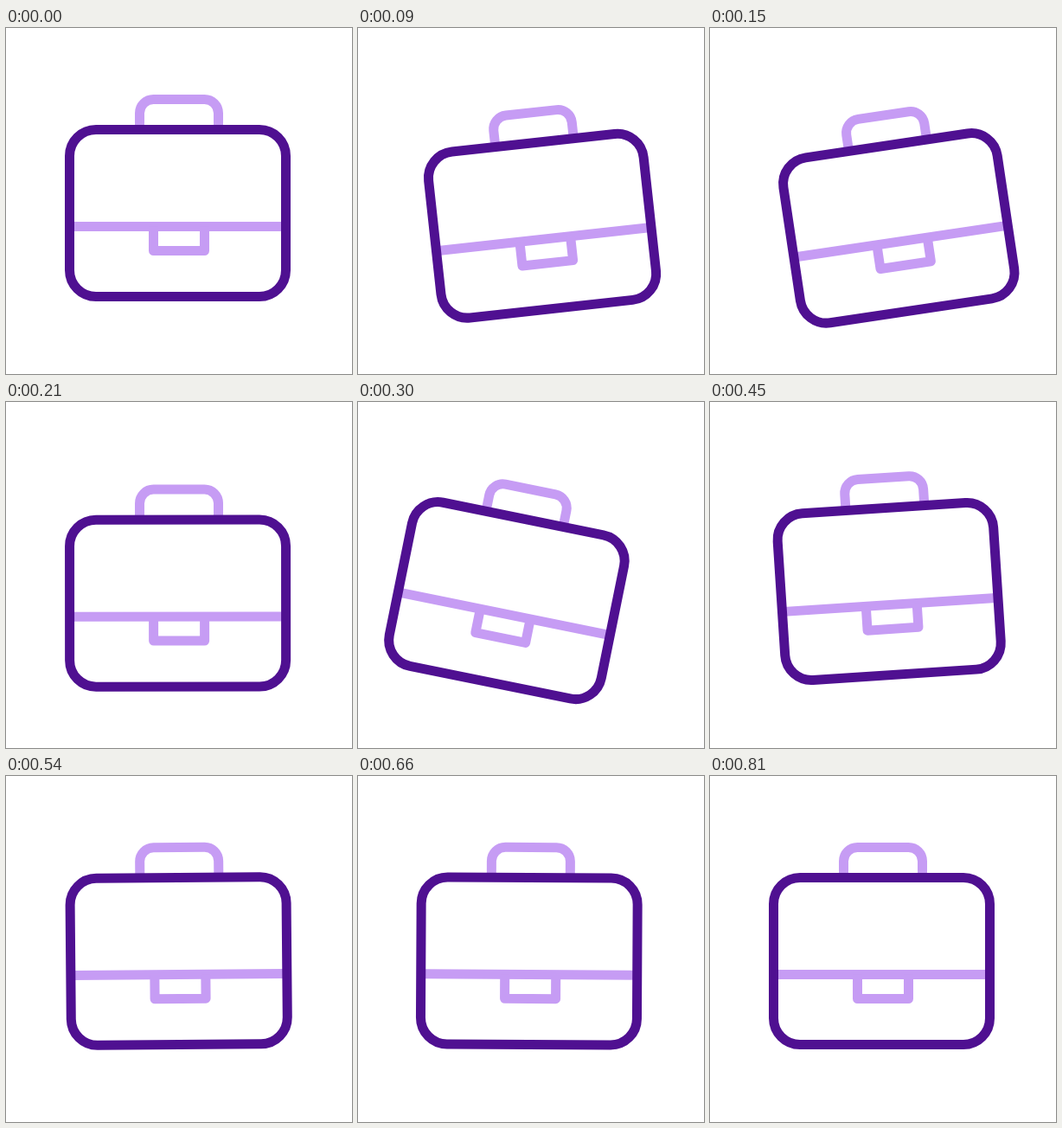
These frames come from a looping animation (400 px wide and 400 px high, 2.84 s). An HTML page with a canvas:

```html
<!DOCTYPE html>
<html lang="en">
<head>
<meta charset="utf-8">
<title>Briefcase</title>
<style>
html, body { margin: 0; width: 100%; height: 100%; overflow: hidden; background: #fff; }
canvas { display: block; width: 400px; height: 400px; }
</style>
</head>
<body>
<canvas id="stage" width="400" height="400"></canvas>
<script>
const ctx = document.getElementById('stage').getContext('2d');
const LOOP = 2840, STEP = 30, END = 810;
const DARK = '#4f1091', LIGHT = '#c69cf4';
const PIVOT = { x: 200, y: 80 };

// [time in ms, value]
const SWING = [[0, 0], [140, -8.7], [294, 11.5], [481, -4.8], [582, 2], [721, -0.86], [810, 0]];
const DROP = [[0, 0], [124, 18.6], [294, 18.6], [535, 0]];

function valueAt(keys, t) {
  for (let i = 1; i < keys.length; i++) {
    const [t0, v0] = keys[i - 1], [t1, v1] = keys[i];
    if (t < t1) {
      const k = (1 - Math.cos(Math.PI * (t - t0) / (t1 - t0))) / 2;
      return v0 + (v1 - v0) * k;
    }
  }
  return keys[keys.length - 1][1];
}

function stroke(color, path) {
  ctx.strokeStyle = color;
  ctx.beginPath();
  path();
  ctx.stroke();
}

function drawCase() {
  ctx.lineWidth = 11;
  ctx.lineJoin = 'round';
  // handle
  stroke(LIGHT, () => {
    ctx.moveTo(154.5, 114);
    ctx.arcTo(154.5, 82.5, 200, 82.5, 16);
    ctx.arcTo(245.5, 82.5, 245.5, 114, 16);
    ctx.lineTo(245.5, 114);
  });
  // seam
  stroke(LIGHT, () => {
    ctx.moveTo(76, 229.5);
    ctx.lineTo(321, 229.5);
  });
  // clasp
  stroke(LIGHT, () => {
    ctx.moveTo(170.5, 229.5);
    ctx.lineTo(170.5, 257.5);
    ctx.lineTo(229.5, 257.5);
    ctx.lineTo(229.5, 229.5);
  });
  // body
  stroke(DARK, () => ctx.roundRect(73.5, 117.5, 250, 193, 30.5));
}

function render(now) {
  const t = Math.min(END, Math.floor((now % LOOP) / STEP) * STEP);
  ctx.fillStyle = '#fff';
  ctx.fillRect(0, 0, 400, 400);
  ctx.save();
  ctx.translate(PIVOT.x, PIVOT.y + valueAt(DROP, t));
  ctx.rotate(valueAt(SWING, t) * Math.PI / 180);
  ctx.translate(-PIVOT.x, -PIVOT.y);
  drawCase();
  ctx.restore();
}

let start = null;
function tick(now) {
  if (start === null) start = now;
  render(now - start);
  requestAnimationFrame(tick);
}
render(0);
requestAnimationFrame(tick);
</script>
</body>
</html>
```
